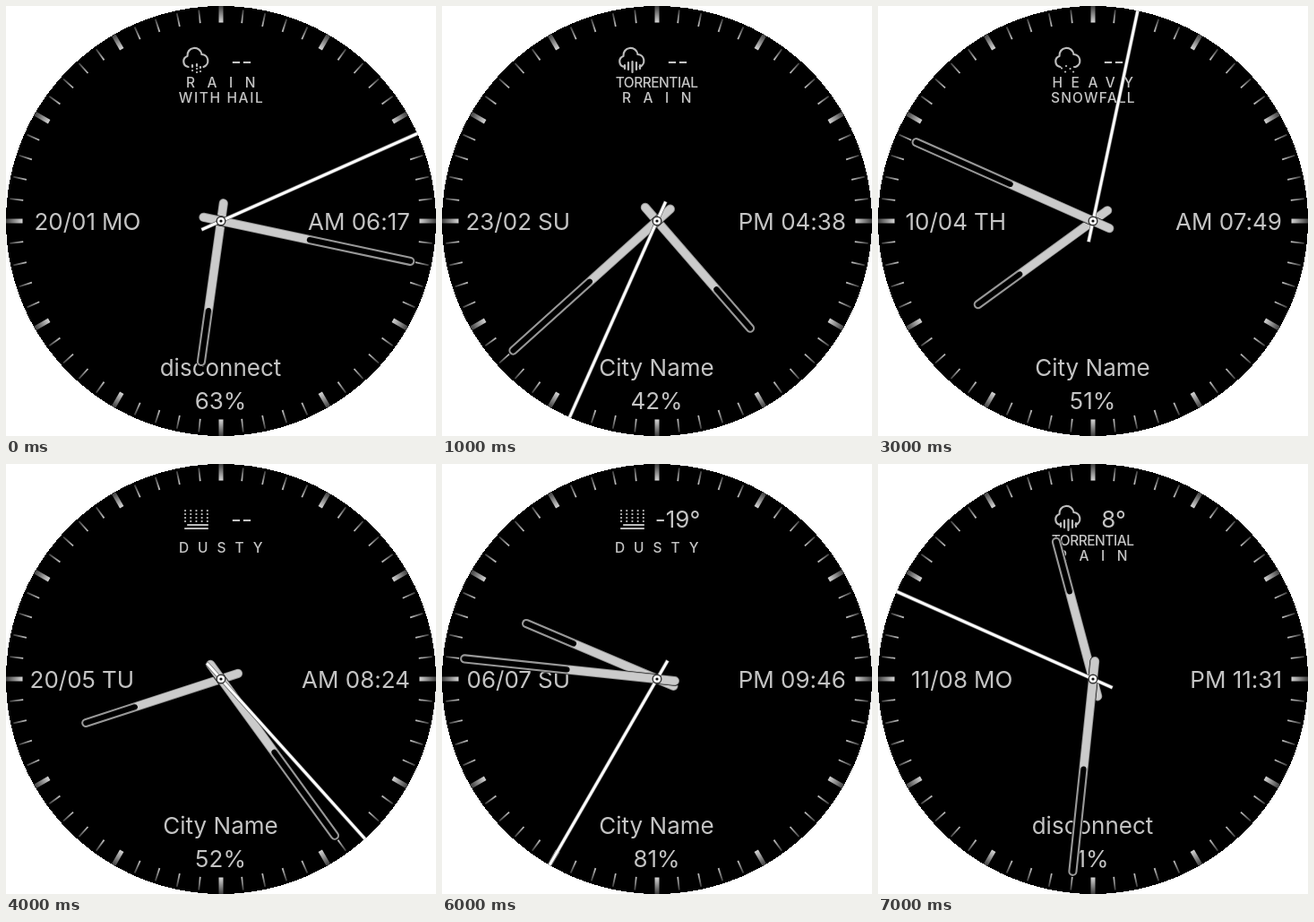
An HTML page that plays this animation: 480 by 480 pixels, repeating every 8 s.

```html
<!DOCTYPE html>
<html lang="en">
<head>
<meta charset="utf-8">
<title>Analog watch face</title>
<style>
  html, body { margin: 0; width: 100%; height: 100%; overflow: hidden; background: #fff; }
  svg { display: block; width: 480px; height: 480px; }
  text { font: 400 26px Inter, sans-serif; font-feature-settings: "calt" 0; fill: #c4c4c4; white-space: pre; }
  .mid { text-anchor: middle; }
  .end { text-anchor: end; }
  #label text { font-size: 15.5px; font-weight: 500; text-anchor: middle; }
  #icon { fill: none; stroke: #bcbcbc; stroke-width: 2.2; stroke-linecap: round; stroke-linejoin: round; }
  .hand line { stroke-linecap: round; }
</style>
</head>
<body>
<svg viewBox="0 0 480 480">
  <defs>
    <radialGradient id="fade" gradientUnits="userSpaceOnUse" cx="0" cy="0" r="240">
      <stop offset=".925" stop-color="#d0d0d0"/>
      <stop offset="1" stop-color="#3c3c3c"/>
    </radialGradient>
    <radialGradient id="thinFade" gradientUnits="userSpaceOnUse" cx="0" cy="0" r="240">
      <stop offset=".925" stop-color="#c4c4c4"/>
      <stop offset="1" stop-color="#202020"/>
    </radialGradient>
  </defs>
  <circle cx="240" cy="240" r="240" shape-rendering="crispEdges"/>
  <g id="ticks" transform="translate(240 240)"></g>
  <path id="icon"/>
  <g id="label"></g>
  <text id="temp" class="mid" x="263" y="71"></text>
  <text id="date" class="end" x="100" y="250"></text>
  <text id="day" x="107" y="250"></text>
  <text id="time" class="end" x="451" y="250"></text>
  <text id="place" class="mid" x="239.5" y="413"></text>
  <text id="battery" class="mid" x="239.5" y="450"></text>
  <g transform="translate(240 240)">
    <g id="hour" class="hand"></g>
    <g id="minute" class="hand"></g>
    <g id="second">
      <path d="M0 24V-240" stroke="#666" stroke-width="4.4"/>
      <path d="M0 23.5V-240" stroke="#fff" stroke-width="3"/>
    </g>
    <circle r="4.8" fill="#fff" stroke="#333" stroke-width="1.4"/>
    <circle r="1.6" fill="#111"/>
  </g>
</svg>
<script>
const $ = id => document.getElementById(id);
const STEP = 1000;

const openCloud = "M203.5 68a6.2 6.2 0 0 1-1-12a8 8 0 0 1 16-2a7.2 7.2 0 0 1 2 14";
const dots = (...points) => points.map(([x, y]) => `M${x} ${y}h.1`).join("");
const bars = (...list) => list.map(([x, y, h]) => `M${x} ${y}v${h}`).join("");

// Dotted columns of blowing dust.
const dust = [0, 1, 2, 3, 4].map(i =>
  dots(...[0, 1, 2, 3].map(j => [200 + i * 6.2, 52 + j * 4]))).join("");

// label lines: [text, baseline, letter spacing]
const weather = {
  hail: {
    icon: openCloud + bars([208, 66, 2], [213, 65, 2], [217, 68, 1]) + dots([208, 72], [213, 70], [213, 74], [217, 73]),
    label: [["RAIN", 91, 13.5], ["WITH HAIL", 107.5, 1.6]]
  },
  cloudy: {
    icon: "M204 71a5 5 0 0 1-1-9.5a8 8 0 0 1 15-3a6.6 6.6 0 0 1 4 12.5z",
    label: [["CLOUDY", 91, 6.5], ["NIGHT", 107.5, 7]]
  },
  snow: {
    icon: openCloud + dots([205, 69.5], [210, 67], [214.5, 70], [219, 68], [209, 73.5], [218, 73.5]),
    label: [["HEAVY", 91, 9.5], ["SNOWFALL", 107.5, 1.2]]
  },
  dusty: {
    icon: dust + "M203 68H225M200 72H225",
    label: [["DUSTY", 99, 10]]
  },
  torrent: {
    icon: openCloud + bars([204, 66, 4], [208, 63, 8], [212.5, 62, 12], [217, 63, 8], [221, 66, 4]),
    label: [["TORRENTIAL", 91, -.5], ["RAIN", 107.5, 13.5]]
  }
};

// date, day, time, seconds, weather, temperature, place, battery
const scenes = [
  ["20/01", "MO", "AM 06:17", 11, "hail", "--", "disconnect", 63],
  ["23/02", "SU", "PM 04:38", 34, "torrent", "--", "City Name", 42],
  ["26/03", "WE", "AM 02:01", 0, "cloudy", "--", "disconnect", 20],
  ["10/04", "TH", "AM 07:49", 2, "snow", "--", "City Name", 51],
  ["20/05", "TU", "AM 08:24", 23, "dusty", "--", "City Name", 52],
  ["28/06", "SA", "AM 09:59", 27, "hail", "0°", "disconnect", 54],
  ["06/07", "SU", "PM 09:46", 35, "dusty", "-19°", "City Name", 81],
  ["11/08", "MO", "PM 11:31", 49, "torrent", "8°", "disconnect", 1]
];

function buildTicks() {
  let marks = "";
  for (let i = 0; i < 60; i++) {
    const major = i % 5 === 0;
    const w = major ? 5 : 1.8;
    marks += `<rect x="${-w / 2}" y="${major ? -240 : -237}" width="${w}" height="${major ? 18.5 : 15}"
      fill="url(#${major ? "fade" : "thinFade"})" transform="rotate(${i * 6})"/>`;
  }
  $("ticks").innerHTML = marks;
}

// A solid shaft whose outer part is a hollow slot.
function buildHand(id, tail, tip) {
  const line = (from, to, width, color) =>
    `<line y1="${from}" y2="${to}" stroke="${color}" stroke-width="${width}"/>`;
  $(id).innerHTML =
    line(tail, -tip, 11.4, "#000") +
    line(tail, -tip, 10.2, "#989898") +
    line(tail, -98, 8.4, "#cbcbcb") +
    line(-101, -tip, 6, "#000");
}

const rotate = (id, deg) => $(id).setAttribute("transform", `rotate(${deg})`);

function show([date, day, time, sec, kind, temp, place, battery]) {
  const texts = { date, day, time, temp, place, battery: battery + "%" };
  for (const id in texts) $(id).textContent = texts[id];

  const { icon, label } = weather[kind];
  $("icon").setAttribute("d", icon);
  $("label").innerHTML = label.map(([text, y, gap]) =>
    `<text x="${239.8 + gap / 2}" y="${y}" letter-spacing="${gap}">${text}</text>`).join("");

  const [h, m] = time.slice(3).split(":").map(Number);
  rotate("hour", h * 30 + Math.floor(m / 2));
  rotate("minute", m * 6);
  rotate("second", sec * 6);
}

buildTicks();
buildHand("hour", 20, 158.5);
buildHand("minute", 20, 216);

const start = performance.now();
let current = -1;
function tick() {
  const index = Math.floor((performance.now() - start) / STEP) % scenes.length;
  if (index !== current) show(scenes[current = index]);
  requestAnimationFrame(tick);
}
tick();
</script>
</body>
</html>
```
